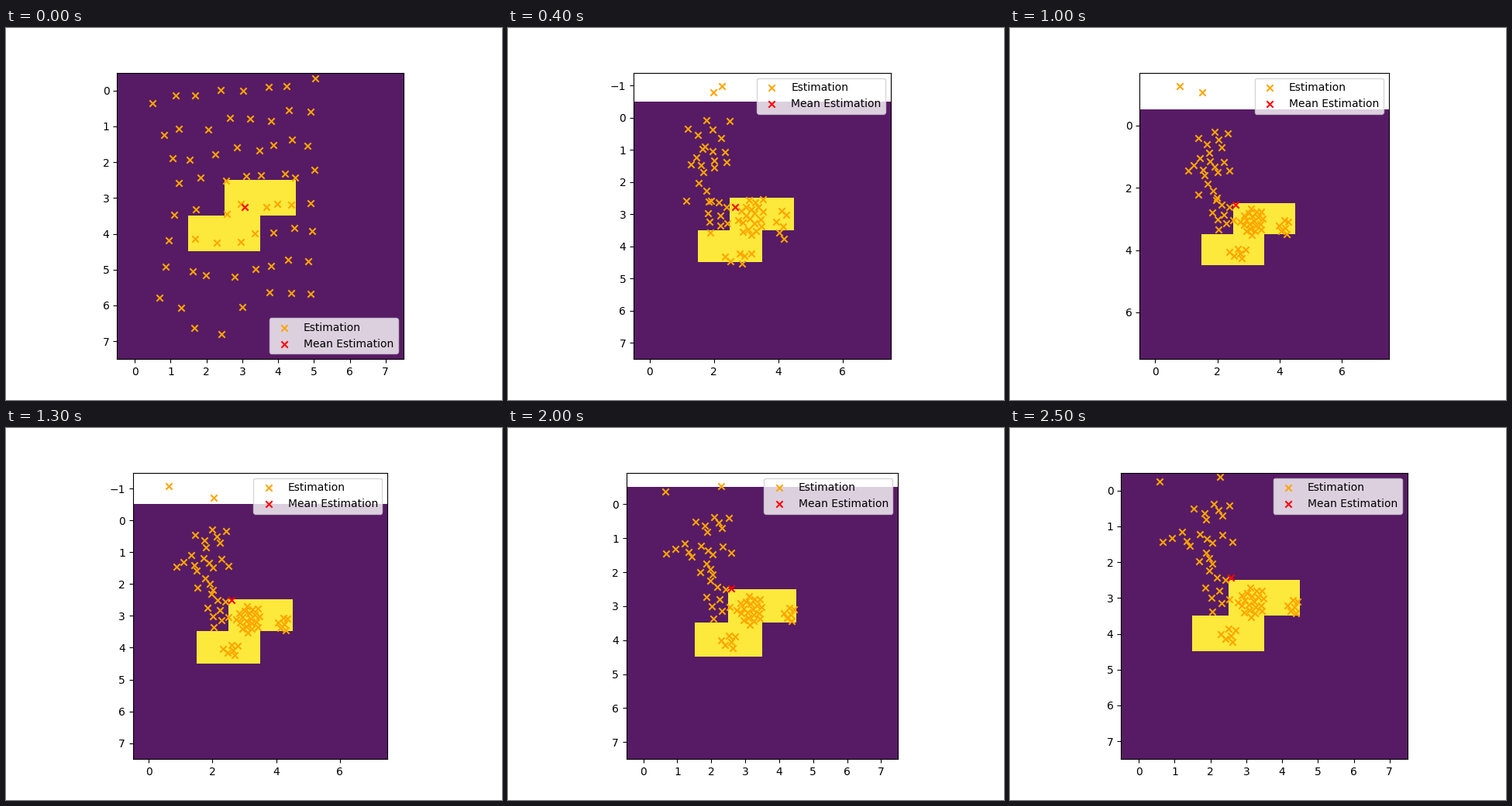
These frames come from a looping animation (640 px wide and 480 px high, 2600 ms). A matplotlib script:

```python
import numpy as np
import matplotlib.pyplot as plt
from matplotlib.animation import FuncAnimation

FRAMES, INTERVAL = 26, 100
TURN = 7  # frame where the fast gathering ends and the slow drift begins
GOLDEN_ANGLE = np.pi * (3 - np.sqrt(5))

# Clusters: size, then (x, y, x radius, y radius) when gathered and when settled
CLUSTERS = [
    (7, (1.75, .40, .60, .55), (2.05, .55, .65, .28)),
    (10, (1.80, 1.30, .50, .45), (1.65, 1.35, 1.10, .25)),
    (4, (1.50, 2.25, .75, .35), (1.85, 1.90, .35, .20)),
    (9, (2.10, 2.90, .40, .50), (2.15, 2.80, .42, .70)),
    (20, (3.10, 3.05, .40, .45), (3.15, 3.10, .42, .45)),
    (6, (4.00, 3.30, .20, .40), (4.30, 3.25, .17, .30)),
    (6, (2.75, 4.15, .35, .20), (2.50, 4.05, .25, .30)),
]

# Key points of the mean and of the two wanderers that push the upper limit
KEYS = [0, 2, 7, 13, 17, 20, 25]
MEAN = ([3.06, 2.72, 2.55, 2.6, 2.6, 2.59, 2.56],
        [3.26, 2.9, 2.58, 2.5, 2.46, 2.47, 2.44])
WANDERERS = [
    ([3.73, 3.1, .95, .62, .64, .65, .58],
     [-.1, -.67, -1.45, -1.07, -.65, -.37, -.25]),
    ([3.02, 2.67, .95, 2.05, 2.27, 2.3, 2.27],
     [0, -.34, -1.45, -.7, -.6, -.53, -.38]),
]


def spread_pose():
    """One estimate per cell: a bent, tilted and jittered 8 x 8 lattice."""
    row, col = np.divmod(np.arange(64), 8)
    r, c = row / 7, col / 7
    left = .35 + .8 * np.sin(np.pi * r * .91)
    x = left + (4.9 - left) * c
    x += .3 * np.sin(np.pi * c) * np.sin(np.pi * r)
    y = .03 + 5.6 * r - .65 * (1 - r) * (c - .5)
    y += 1.2 * r ** 6 * np.exp(-(col - 2.5) ** 2 / 2)
    jitter = np.random.default_rng(4).uniform(-.15, .15, (64, 2))
    points = np.column_stack([x, y]) + jitter
    return np.delete(points, [4, 5], axis=0)  # these two are the wanderers


def fill_ellipse(count, x, y, rx, ry):
    k = np.arange(count)
    radius, angle = np.sqrt((k + .5) / count), k * GOLDEN_ANGLE
    return np.column_stack([x + rx * radius * np.cos(angle),
                            y + ry * radius * np.sin(angle)])


def short_paths(source, dest):
    """Order of dest that gives each source point a short way."""
    order = np.arange(len(dest))
    swapped = True
    while swapped:
        swapped = False
        for i in range(len(order)):
            for j in range(i):
                change = dest[order[j]] - dest[order[i]]
                if np.dot(source[i] - source[j], change) > 1e-9:
                    order[[i, j]] = order[[j, i]]
                    swapped = True
    return order


def ease_out(s, power):
    return 1 - (1 - s) ** power


def along(path, frame):
    return [np.interp(frame, KEYS, axis) for axis in path]


spread = spread_pose()
gathered = np.vstack([fill_ellipse(n, *early) for n, early, late in CLUSTERS])
settled = np.vstack([fill_ellipse(n, *late) for n, early, late in CLUSTERS])
order = short_paths(spread, gathered)
gathered, settled = gathered[order], settled[order]

grid = np.zeros((8, 8))
grid[3, 3:5] = grid[4, 2:4] = 1


def estimates(frame):
    if frame <= TURN:
        a, b, u = spread, gathered, ease_out(frame / TURN, 2.7)
    else:
        s = (frame - TURN) / (FRAMES - 1 - TURN)
        a, b, u = gathered, settled, ease_out(s, 3)
    roaming = [along(path, frame) for path in WANDERERS]
    return np.vstack([roaming, a + (b - a) * u])


fig, ax = plt.subplots(figsize=(6.4, 4.8), dpi=100)


def draw(frame):
    ax.clear()
    ax.imshow(grid, cmap="viridis", alpha=0.9)
    ax.scatter(*estimates(frame).T, marker="x", color="orange",
               label="Estimation")
    ax.scatter(*along(MEAN, frame), marker="x", color="red",
               label="Mean Estimation")
    ax.legend(loc="best")
    return []


anim = FuncAnimation(fig, draw, frames=FRAMES, interval=INTERVAL,
                     init_func=lambda: draw(0), repeat=True, repeat_delay=0)
plt.show()
```
